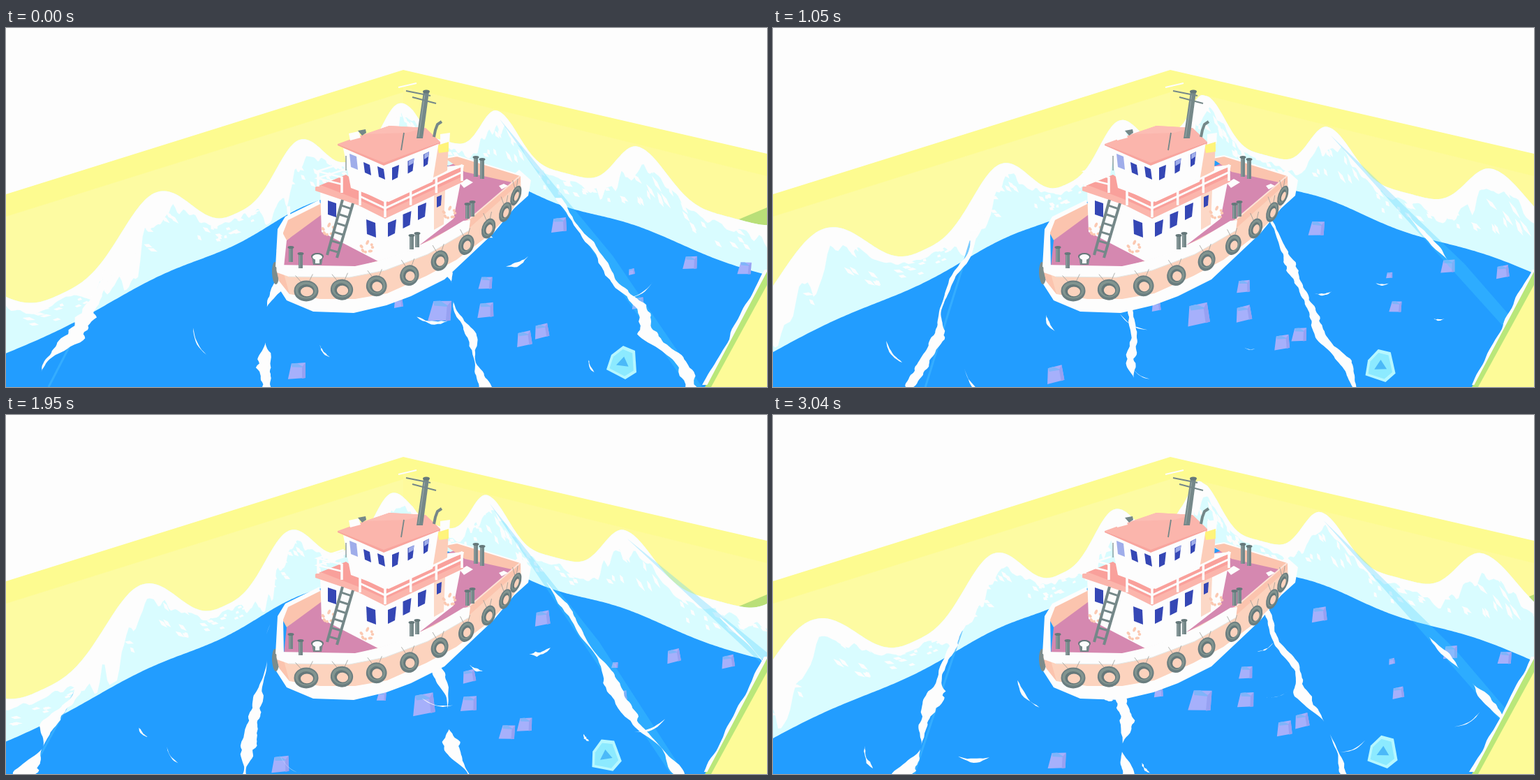
Recreate the animation shown at these times as an HTML page with a canvas. Size 1090 px wide and 514 px high, loop 3110 ms.

```html
<!DOCTYPE html>
<html lang="en">
<head>
<meta charset="utf-8">
<title>Tugboat</title>
<style>
html, body { margin: 0; width: 100%; height: 100%; overflow: hidden; background: #fdfdfd; }
canvas { display: block; width: 100vw; height: 100vh; }
</style>
</head>
<body>
<canvas id="stage" width="1090" height="514"></canvas>
<script>
const W = 1090, H = 514, LOOP = 3110, STEP = LOOP / 45, PERIOD = 2110, TAU = Math.PI * 2;
const stage = document.getElementById('stage');
let g = stage.getContext('2d');

const WHITE = '#fdfdfd', CYAN = '#d9fcff', SEA = '#229dff', GREY = '#758889', DARK = '#65787a',
  PEACH = '#fcd3be', SHADE = '#fbc4ae', PINK = '#fbb5ac', CORAL = '#f9a09b', DECK = '#d588b0', GLASS = '#3547b5';

// ---------- helpers ----------
const mix = (a, b, k) => a + (b - a) * k;
const clamp = v => Math.max(0, Math.min(1, v));
const rnd = n => { const s = Math.sin(n * 127.1 + 3.7) * 43758.5453; return s - Math.floor(s); };

function noise(x, y) {
  const i = Math.floor(x), j = Math.floor(y);
  const ease = v => v * v * (3 - 2 * v), a = ease(x - i), b = ease(y - j);
  const h = (p, q) => rnd(p + q * 57.3);
  return mix(mix(h(i, j), h(i + 1, j), a), mix(h(i, j + 1), h(i + 1, j + 1), a), b);
}

function trace(pts) {
  g.beginPath();
  for (let i = 0; i < pts.length; i += 2) g.lineTo(pts[i], pts[i + 1]);
}
function poly(color, ...pts) { trace(pts); g.closePath(); g.fillStyle = color; g.fill(); }
function line(color, width, ...pts) {
  trace(pts); g.strokeStyle = color; g.lineWidth = width; g.stroke();
}
function oval(color, x, y, rx, ry, tilt = 0) {
  g.beginPath(); g.ellipse(x, y, rx, ry, tilt, 0, TAU); g.fillStyle = color; g.fill();
}

// ---------- waves ----------
// u counts wave lengths along the two back walls; CORNER is where they meet.
const CORNER = 3.5;
const wallX = u => u < CORNER ? (383 * u - 107) / (1 + .285 * u) : (703 + 75 * (u - 4)) / (1 - .14 * (u - 4));
const peakY = x => Math.max(314 - .366 * x, .255 * x - 61);
const troughY = x => Math.max(417 - .46 * x, .268 * x - 7);
const shoreY = x => Math.max(465 - .4825 * x, .348 * x - 27);
const footX = u => 45 + 320 * (u - 1) - 20 * Math.max(0, u - 3);

function swell(u, d) {
  const sharp = u < CORNER ? (d < 0 ? 1.6 : 1.3) : (d < 0 ? 3 : 1.8);
  return Math.pow(.5 + .5 * Math.cos(d * TAU), sharp);
}

function section(u, phase) {
  const x = wallX(u), d = u - phase - Math.round(u - phase);
  const top = mix(troughY(x), peakY(x), swell(u, d));
  const low = Math.max(top + 8, shoreY(x) - 4 * Math.cos(d * TAU));
  return { x, top, low, d, u };
}

function backWaves(phase, t) {
  const cuts = [];
  for (let u = -.1; u < 6.2; u += .0125) cuts.push(section(u, phase));
  const band = (color, a, b) => poly(color,
    ...cuts.flatMap(c => [c.x, a(c)]),
    ...cuts.slice().reverse().flatMap(c => [c.x, b(c)]));

  band(CYAN, c => c.top, c => c.low + 3);
  band(WHITE, c => c.top, c => {
    const lit = clamp((c.d + .42) * 6) * clamp((.06 - c.d) * 5);
    const k = .22 + (c.u < CORNER ? .6 : .25) * lit;
    return mix(c.top, c.low, Math.min(.95, k * (.55 + .8 * noise((c.u - phase) * 30, t / 900))));
  });

  // Foam flecks riding on the slopes
  for (let n = -1; n < 6; n++) for (let i = 0; i < 34; i++) {
    const s = n * 41 + i, u = n + phase + rnd(s) - .4;
    if (u < 0 || u > 6) continue;
    const a = section(u, phase), b = section(u + .02 + .04 * rnd(s + 9), phase), v = .1 + .55 * rnd(s + 5);
    const y1 = mix(a.top, a.low, v), y2 = mix(b.top, b.low, v + .1), mx = (a.x + b.x) / 2, my = (y1 + y2) / 2;
    poly(WHITE, a.x, y1, mx + 1, my - 2.5, b.x, y2, mx - 2, my + 2);
  }
  band(SEA, c => c.low, () => H + 20);
}

function crestFoam(phase, t) {
  for (let n = -1; n < 5; n++) {
    const u = n + phase;
    if (u < .4 || u > 5.5) continue;
    const x0 = wallX(u), y0 = peakY(x0), x1 = footX(u);
    const at = y => mix(x0, x1, (y - y0) / (H - y0));
    if (u > CORNER) {
      const mid = (y0 + H) / 2 + 10;
      poly('rgba(70,205,255,.3)', x0 + 4, y0 + 12, at(mid) + 18, mid, x1 + 12, H, x1 - 8, H);
    } else if (u < 1.5) {
      line('rgba(60,180,255,.7)', 3, at(y0 + 110), y0 + 110, x1 + 16, H);
    }

    const start = u < CORNER ? Math.max(y0 + 95, shoreY(x0) - 25) : y0 + 125;
    const l = [], r = [];
    for (let y = start; y <= H + 4; y += 3) {
      const depth = (y - 200) / 314;
      const body = Math.max(0, noise(y / 34 + n * 13, t / 420 + n * 7) * 1.7 - .45);
      const w = body * (6 + 14 * depth) * (.65 + .6 * noise(y / 6 + n * 31, t / 260));
      const c = at(y) + (noise(y / 40 + n * 9, t / 500) - .5) * 22 * clamp(depth + .2);
      l.push(c - w * .75, y);
      r.unshift(c + w * (.5 + .4 * noise(y / 5, n + t / 300)), y);
    }
    poly(WHITE, ...l, ...r);
  }
}

// Thin torn streaks that swell and vanish on the open sea
function streaks(t) {
  for (let i = 0; i < 9; i++) {
    const clock = t / 700 + i / 9, s = i * 23 + Math.floor(clock) * 7;
    const x = mix(130, 980, (i + rnd(s)) / 9), y = mix(shoreY(x) + 60, 500, rnd(s + 1));
    const len = mix(12, 55, rnd(s + 2)), size = Math.sin(clock % 1 * Math.PI) * mix(2, 6, rnd(s + 3));
    const a = [], b = [];
    for (let k = 0; k <= 1; k += .1) {
      const arc = Math.sin(k * Math.PI), h = arc * size * noise(k * 9 + s, 1);
      a.push(k * len, arc * len * .12 - h);
      b.unshift(k * len, arc * len * .12 + h);
    }
    g.save();
    g.translate(x, y);
    g.rotate(mix(-.6, 1.3, rnd(s + 4)));
    poly(WHITE, ...a, ...b);
    g.restore();
  }
}

// ---------- floating ice ----------
// x, y, size
const cubes = [[792, 282, 22], [687, 365, 19], [622, 405, 32], [687, 404, 23], [742, 445, 22], [767, 434, 21],
  [905, 394, 17], [980, 336, 20], [1058, 344, 19], [417, 491, 25], [562, 394, 13], [896, 349, 9]];

function ice(t) {
  const dx = 12 * Math.cos(t / 3900 * TAU) - 12, dy = -dx * .38;
  cubes.forEach(([x, y, size], i) => {
    g.save();
    g.translate(x + dx, y + dy);
    g.rotate(Math.sin(t / 520 + i) * .13);
    g.scale(size / 2, size / 2);
    poly('#a6b0fb', -.7, -.8, .9, -1, 1, .75, -1, 1);
    poly('#7fb4fa', -.7, -.8, -.1, -.9, .8, -.45, -.6, -.4);
    poly('#97a1f2', .55, -.5, .9, -1, 1, .75, .6, .85);
    g.restore();
  });
  g.save();
  g.translate(882 + dx, 480 + dy);
  g.rotate(dx * .012);
  poly('#b6f7ff', -22, 9, -15, -12, 2, -25, 19, -18, 21, 13, 5, 23);
  g.scale(.8, .8);
  poly('#8ceaff', -22, 9, -15, -12, 2, -25, 19, -18, 21, 13, 5, 23);
  poly('#4bb9f8', -10, 3, 4, -12, 12, 6);
  g.restore();
}

// ---------- fixed scenery ----------
function ground() {
  g.fillStyle = WHITE;
  g.fillRect(0, 0, W, H);
  poly('#fdfb90', 0, 238, 569, 60, W, 180, W, H, 0, H);
  poly('#fdfba2', 0, 270, 569, 92, 569, H, 0, H);
  poly('#fefa9c', 569, 84, W, 212, W, H, 569, H);
  poly('#b9df78', 1040, 278, W, 257, W, 305, 1050, 300);
  line(WHITE, 2, 562, 85, 588, 79);
}

function rightBank(t) {
  poly('#b9e77a', W, 348, W, 400, 1030, H, 1001, H);
  poly('#fdfb98', W, 368, W, H, 1010, H);
  const l = [], r = [];
  for (let y = 346; y <= H; y += 5) {
    const x = W - (y - 346) * .528;
    l.push(x - 1 - 5 * noise(y / 16, t / 500), y);
    r.unshift(x + 1.5, y);
  }
  poly(WHITE, ...l, ...r);
}

// ---------- boat ----------
function posts(x, y, h, gap = 8, drop = -3) {
  for (let i = 0; i < 2; i++) {
    const px = x + gap * i, py = y + drop * i;
    line(GREY, 6, px, py, px, py + h);
    oval(DARK, px, py, 4.5, 2);
    line('#93a3a4', 1.2, px - 1.5, py + 2, px - 1.5, py + h);
  }
}

// Window with its top edge rising to the right; the foot leans by `lean`.
function pane(x, y, w, h, rise, lean = 0, color = GLASS) {
  poly(color, x, y, x + w, y - rise, x + w + lean, y - rise + h, x + Math.max(0, lean), y + h);
}

function tyre(x, y, rx, ry, tilt) {
  line('#9b9c97', .8, x - rx, y - ry - 9, x, y - 5, x + rx * .6, y - ry - 11);
  oval('#6b7e80', x, y, rx + 2, ry + 2, tilt);
  oval('#82948f', x, y - 1, rx, ry - 1, tilt);
  oval(DARK, x, y, rx * .75, ry * .72, tilt);
  oval(PEACH, x + 1, y + 1, rx * .58, ry * .53, tilt);
}

function flower(x, y) {
  for (let i = 0; i < 7; i++)
    oval('#fbc9b2', x + 8 * Math.cos(i * 2.4), y + 7 * Math.sin(i * 2.4), 2 + rnd(i) * 2, 2, i);
}

function hull() {
  poly(WHITE, 384, 362, 402, 390, 440, 406, 498, 408, 545, 397, 580, 384, 628, 360, 662, 328, 698, 294,
    728, 258, 748, 240, 752, 218, 735, 203, 660, 270, 500, 345);
  oval('#7b8c8c', 386, 351, 5, 16, -.05);
  poly(PEACH, 387, 340, 391, 362, 406, 381, 450, 388, 500, 388, 546, 380, 602, 355, 645, 332, 690, 298, 720, 268,
    738, 240, 737, 214, 662, 272, 500, 345);
  poly(SHADE, 387, 345, 398, 352, 406, 381, 391, 362);

  poly(DECK, 398, 342, 402, 304, 455, 262, 500, 250, 652, 190, 730, 220, 706, 246, 662, 274, 570, 323, 505, 341);
  poly(SHADE, 396, 293, 404, 272, 452, 250, 455, 265, 402, 304);
  poly(SHADE, 628, 186, 646, 183, 736, 210, 729, 222, 657, 206);
  line(WHITE, 2, 630, 186, 646, 183, 737, 211);
  poly(WHITE, 386, 342, 389, 288, 400, 270, 449, 246, 450, 252, 404, 275, 397, 293, 398, 344);
  poly(SHADE, 737, 212, 737, 221, 664, 286, 660, 276);
  line('#fde2d6', 2, 736, 212, 662, 275);
  poly(WHITE, 387, 339, 500, 341, 532, 334, 570, 321, 612, 302, 655, 276, 665, 275, 663, 290, 604, 324,
    543, 347, 492, 357, 405, 356, 388, 350);
  line('#e4e8e6', 1, 405, 356, 492, 357, 543, 347, 604, 324, 663, 290);
  poly(WHITE, 650, 222, 660, 216, 669, 221, 656, 229);
  poly(WHITE, 706, 226, 713, 223, 719, 226, 710, 231);

  for (let i = 0; i < 9; i++) {
    const bend = i - 2.2;
    tyre(430 + 51.2 * i - .2135 * i ** 3, 379 - 11.9 * (bend + Math.hypot(bend, 1)),
      15.5 - 1.35 * i, 13, Math.min(.35, i * .12));
  }
}

function cabin() {
  // Lower house
  poly(WHITE, 450, 232, 540, 264, 612, 200, 656, 196, 641, 273, 583, 318, 533, 334, 452, 292);
  poly('#fcd8c7', 613, 240, 629, 232, 627, 281, 613, 289);
  pane(461, 247, 12, 20, -4);
  pane(516, 274, 13, 21, -5, 1);
  for (let i = 0; i < 3; i++) pane(547 + 21.5 * i, 279 - 12 * i, 12, 20, 5, -2);
  pane(617, 242, 7, 15, 3, -1);
  flower(517, 314); flower(462, 289); flower(635, 265);

  // Upper deck with funnel
  poly('#fccdb9', 607, 166, 634, 164, 632, 204, 610, 217);
  poly(WHITE, 622, 152, 636, 150, 635, 166, 622, 168);
  poly('#fff47b', 618, 168, 634, 163, 634, 177, 620, 179);
  poly(CORAL, 443, 228, 487, 210, 510, 226, 545, 246, 612, 215, 653, 199, 655, 219, 543, 272, 506, 254);
  poly(PINK, 443, 228, 451, 225, 505, 246, 543, 263, 655, 212, 655, 220, 543, 273, 505, 254, 443, 233);

  // Bridge
  poly(WHITE, 483, 172, 541, 192, 620, 163, 611, 220, 548, 249, 494, 229);
  pane(492, 180, 10, 19, -4, 2, '#9fadea');
  for (let i = 0; i < 2; i++) pane(512 + 20 * i, 192 + 6 * i, 9, 15, -4, 2);
  for (let i = 0; i < 3; i++) {
    pane(553 + 22.5 * i, 200 - 9.5 * i, 10 - i, 18, 4, -2);
    if (i) pane(554 + 22.5 * i, 200 - 9.5 * i, 9 - i, 7, 4, -1, '#9fadea');
  }
  line(GREY, 1.2, 487, 183, 487, 204);

  // Railings
  for (const y of [0, 10]) {
    line(WHITE, 3, 507, 231 + y, 543, 248 + y, 654, 196 + y);
    line(WHITE, 2.5, 482, 214 + y, 446, 205 + y, 484, 193 + y);
  }
  for (let i = 0; i < 4; i++) {
    const x = mix(543, 653, i / 3), y = mix(248, 196, i / 3);
    line(WHITE, 3.5, x, y, x, y + 23);
  }
  for (const [x, y] of [[507, 231], [447, 204], [481, 213]]) line(WHITE, 3.5, x, y, x, y + 23);

  // Roof
  poly(PINK, 475, 166, 514, 152, 549, 140, 601, 143, 622, 163, 541, 194);
  poly('#fcbdb4', 514, 152, 549, 140, 601, 143, 574, 150);
  poly('#f8a59e', 475, 166, 541, 193, 622, 163, 622, 165, 541, 197, 475, 168);

  // Roof fittings
  poly(WHITE, 491, 151, 505, 148, 508, 157, 493, 161);
  poly(GREY, 504, 147, 515, 145, 516, 150, 510, 154);
  poly(GREY, 588, 158, 598, 91, 606, 91, 597, 158);
  line('#93a3a4', 1.3, 591, 156, 600, 94);
  oval(DARK, 602, 91, 5, 2.5);
  line(GREY, 2, 573, 90, 608, 97);
  line(GREY, 2, 582, 99, 616, 108);
  line(GREY, 1.8, 566, 175, 570, 150);
  line(GREY, 4, 613, 156, 615, 146, 618, 138, 624, 134);
}

function fittings() {
  line(GREY, 4, 482, 246, 460, 325);
  line(GREY, 4, 497, 251, 474, 329);
  for (let k = .1; k < 1; k += .16)
    line(GREY, 3, mix(482, 460, k), mix(246, 325, k), mix(497, 474, k), mix(251, 329, k));

  posts(408, 314, 21, 14, 9);
  posts(581, 297, 20);
  posts(661, 252, 21, 7);
  posts(673, 185, 28, 9, 3);

  // Barrel
  poly(GREY, 438, 328, 454, 328, 452, 339, 440, 339);
  oval(DARK, 446, 327, 9, 5);
  oval(WHITE, 446, 328, 7, 4);
  line(WHITE, 6, 446, 330, 446, 337);
}

// The boat never moves, so it is painted once.
function paintBoat() {
  const layer = document.createElement('canvas'), screen = g;
  layer.width = W;
  layer.height = H;
  g = layer.getContext('2d');
  hull(); cabin(); fittings();
  g = screen;
  return layer;
}
const boat = paintBoat();

function draw(t) {
  const phase = t / PERIOD % 1;
  ground();
  backWaves(phase, t);
  ice(t);
  crestFoam(phase, t);
  streaks(t);
  rightBank(t);
  g.drawImage(boat, 0, 0);
}

function tick() {
  const k = Math.floor((performance.now() % LOOP + 6) / STEP) % 45;
  draw(k * STEP);
  requestAnimationFrame(tick);
}
tick();
</script>
</body>
</html>
```
